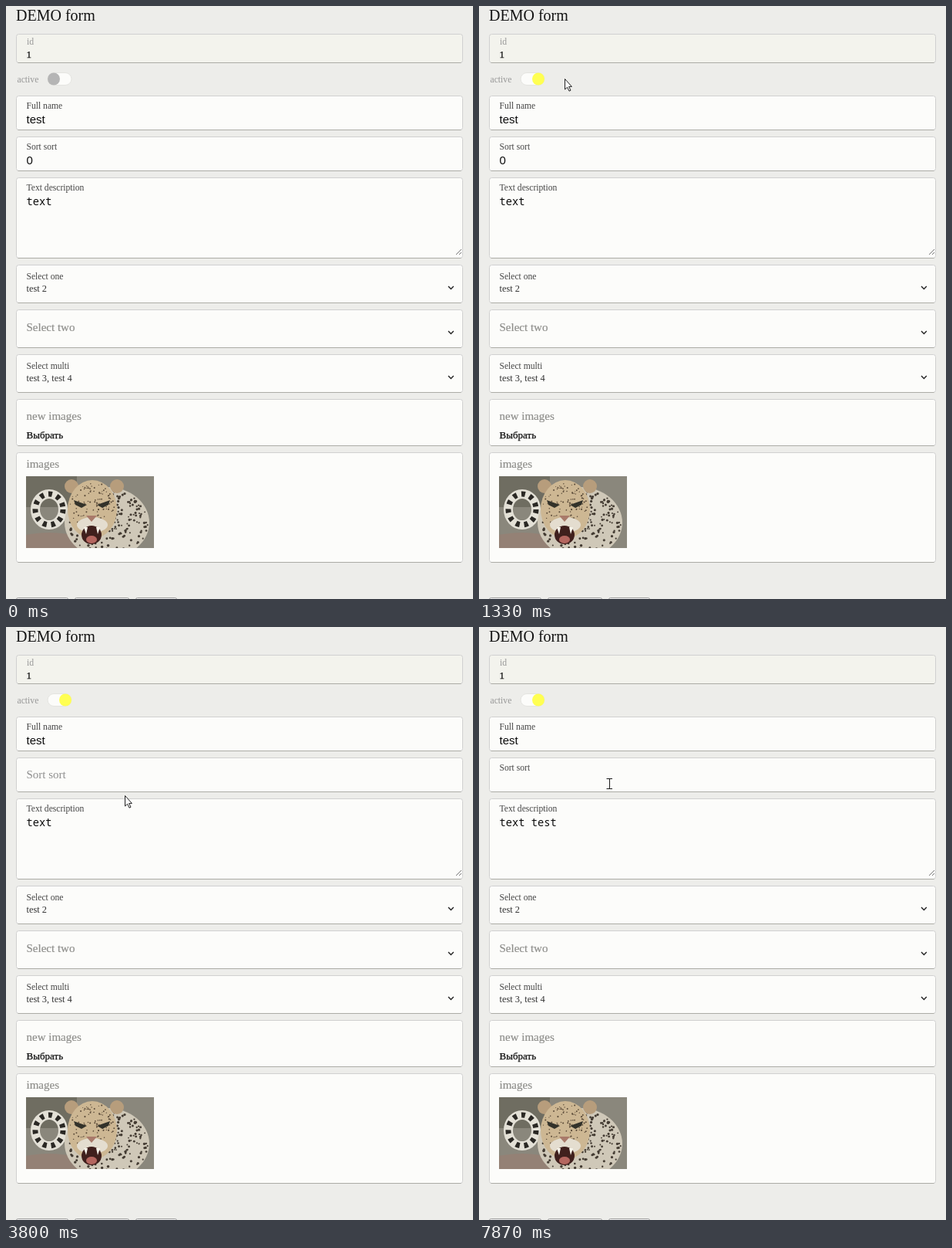
Animation of 606 by 768 pixels, one loop 8 s. Source, as an HTML page:

```html
<!DOCTYPE html>
<html lang="en">
<head>
<meta charset="utf-8">
<title>Demo form</title>
<style>
  html, body { margin: 0; width: 100%; height: 100%; overflow: hidden; background: #ededea; }
  svg { display: block; width: 606px; height: 768px; }
  text { font-family: "Liberation Serif", "Times New Roman", serif; white-space: pre; }
  .title { font-size: 20px; fill: #141414; }
  .label { font-size: 11.6px; fill: #444; }
  .dim { font-size: 11.7px; fill: #979797; }
  .hint { font-size: 15px; fill: #8f8f8c; stroke: #8f8f8c; stroke-width: .2; }
  .option { font-size: 12.4px; fill: #333; }
  .pick { font-size: 13px; fill: #0c0c0c; stroke: #0c0c0c; stroke-width: .25; }
  .input { font: 15px "Liberation Sans", Arial, sans-serif; fill: #0c0c0c; }
  .mono { font: 13.75px "Noto Sans Mono", "DejaVu Sans Mono", monospace; fill: #0c0c0c; }
</style>
</head>
<body>
<svg viewBox="0 0 606 768">
  <rect width="606" height="768" fill="#ededea"/>
  <g id="form"></g>

  <rect x="54" y="86.5" width="31" height="16" rx="8" fill="#fcfcfa" stroke="#e4e4e0"/>
  <circle id="knob" cy="94.5" r="8"/>

  <path d="M584 322l7 -7M588 322l3 -3" stroke="#777" fill="none"/>

  <clipPath id="frame"><rect width="166" height="93"/></clipPath>
  <g transform="translate(26 609)" clip-path="url(#frame)">
    <rect width="166" height="93" fill="#8a877c"/>
    <rect width="66" height="40" fill="#6f6d61"/>
    <ellipse cx="30" cy="95" rx="60" ry="22" fill="#948175"/>
    <ellipse cx="30" cy="43" rx="18" ry="20" fill="none" stroke="#e3e0d6" stroke-width="12"/>
    <ellipse cx="30" cy="43" rx="18" ry="20" fill="none" stroke="#2a2824" stroke-width="7" stroke-dasharray="5 6"/>
    <ellipse cx="105" cy="60" rx="55" ry="46" fill="#cfc8b8"/>
    <g id="coat" fill="#443c33"></g>
    <circle cx="59" cy="13" r="9" fill="#b79d7c"/>
    <circle cx="118" cy="13" r="9" fill="#b79d7c"/>
    <ellipse cx="86" cy="43" rx="32" ry="38" fill="#cdb793"/>
    <g id="face" fill="#5a4a38"></g>
    <path d="M62 31l17 6l-7 4l-8 -4zM109 31l-17 6l7 4l8 -4z" fill="#33322a"/>
    <ellipse cx="86" cy="63" rx="20" ry="10" fill="#e4ddcf"/>
    <path d="M78 51h14l-7 8z" fill="#a97a6a"/>
    <ellipse cx="85" cy="76" rx="13" ry="12" fill="#40201d"/>
    <ellipse cx="85" cy="82" rx="7" ry="5" fill="#b4665f"/>
    <path d="M75 66l3 9l2 -9M91 66l2 9l3 -9" fill="#f7f4ea"/>
  </g>

  <rect id="caret" width="1" fill="#111"/>
  <g id="cursor">
    <path id="pointer" d="M.5 .5V14L3.6 11.2L6 16.2L8 15.2L5.6 10.4H9.4Z" fill="#fff" stroke="#222" stroke-linejoin="round"/>
    <path id="beam" d="M-3.5 -6.5H4M.5 -6.5V6.5M-3.5 6.5H4" fill="none" stroke="#1c1c1c"/>
  </g>
</svg>
<script>
const LOOP = 8000, BLINK = 530, LEFT = 26.5, CHAR = 8.25;
const $ = id => document.getElementById(id);

function add(parent, tag, attrs, text) {
  const el = document.createElementNS("http://www.w3.org/2000/svg", tag);
  for (const k in attrs) el.setAttribute(k, attrs[k]);
  if (text) el.textContent = text;
  $(parent).appendChild(el);
  return el;
}
function set(el, attrs) {
  for (const k in attrs) el.setAttribute(k, attrs[k]);
}
const show = (el, on) => set(el, { visibility: on ? "visible" : "hidden" });
const word = (cls, x, y, s) => add("form", "text", { class: cls, x, y }, s);

function box(top, height, fill = "#fcfcfa") {
  add("form", "rect", { x: 13.5, y: top, width: 579, height, rx: 3, fill, stroke: "#d0d0d0" });
  add("form", "path", { d: `M15.5 ${top + height}H590.5`, stroke: "#acaca6" });
}

// Field builders: each draws at the given top and tells its height.
const input = (label, value, cls = "input", height = 44) => top => {
  box(top, height);
  return { top, height, typed: true,
    label: word("label", LEFT, top + 16, label),
    value: word(cls, LEFT, top + 35, value) };
};
const select = (label, value) => top => {
  box(top, 49);
  if (value) {
    word("label", LEFT, top + 18, label);
    word("option", LEFT, top + 34.5, value);
  } else word("hint", LEFT, top + 27.5, label);
  add("form", "path", { d: `M574 ${top + 27.5}l3.4 3.4l3.4 -3.4`, fill: "none", stroke: "#222", "stroke-width": 1.4 });
  return { top, height: 49 };
};
const files = (label, height, dy, action) => top => {
  box(top, height);
  word("hint", LEFT, top + dy, label);
  if (action) word("pick", LEFT, top + 50, action);
  return { top, height };
};

word("title", 13, 18.5, "DEMO form");
box(36.5, 37, "#f3f3ed");
word("dim", 27, 49.5, "id");
word("pick", LEFT, 67, "1");
word("dim", 14.5, 98.5, "active");

let top0 = 116.5;
const fields = [
  input("Full name", "test"),
  input("Sort sort", "0"),
  input("Text description", "text", "mono", 104),
  select("Select one", "test 2"),
  select("Select two"),
  select("Select multi", "test 3, test 4"),
  files("new images", 60, 26, "Выбрать"),
  files("images", 142, 19)
].map(build => {
  const field = build(top0);
  top0 += field.height + 9;
  return field;
});
const [, sort, note] = fields;

let left = 13.5;
for (const width of [67, 70, 53]) {
  add("form", "rect", { x: left, y: 766.5, width, height: 20, rx: 2, fill: "#efefef", stroke: "#a0a0a0" });
  left += width + 9;
}

let seed = 7;
const rnd = () => (seed = (seed * 16807) % 2147483647) / 2147483647;
function spots(parent, n, cx, cy, rx, ry, size) {
  for (let i = 0; i < n; i++) {
    const a = rnd() * 2 * Math.PI, d = Math.sqrt(rnd());
    add(parent, "circle", { cx: cx + rx * d * Math.cos(a), cy: cy + ry * d * Math.sin(a), r: size * (0.6 + rnd() * 0.6) });
  }
}
spots("coat", 240, 105, 60, 53, 44, 1.5);
spots("face", 110, 86, 38, 29, 31, 0.9);

const mix = (a, b, k) => a + (b - a) * k;
function ramp(t, from, dur) {
  const v = Math.max(0, Math.min(1, (t - from) / dur));
  return v * v * (3 - 2 * v);
}

// Moments of the story
const enter = 70, toggled = 1000, sortFocus = 2000, erased = 2870, sortBlur = 3600, sortAgain = 7340;
const keys = [4270, 4600, 4635, 4670, 5870];

const legs = [
  { at: enter, dur: 600, to: [84, 100] },
  { at: 730, dur: 140, to: [74, 97] },
  { at: 1070, dur: 260, to: [111, 94] },
  { at: 1530, dur: 600, to: [40, 198] },
  { at: 2400, dur: 130, to: [77, 205] },
  { at: 3270, dur: 400, to: [154, 218] },
  { at: 7070, dur: 400, to: [169, 203] }
];
function mouse(t) {
  let p = [336, 260];
  for (const { at, dur, to } of legs) {
    const k = ramp(t, at, dur);
    p = p.map((v, i) => mix(v, to[i], k));
  }
  return p.map(Math.round);
}

// The caret blinks from the latest click or key press.
function caret(t, typed) {
  let since, x = 27, y = sort.top + 21.5;
  if (t >= sortAgain) since = sortAgain;
  else if (typed) {
    since = keys[typed - 1];
    x = Math.floor(LEFT + (4 + typed) * CHAR);
    y = note.top + 21.5;
  } else if (t >= sortFocus && t < sortBlur) {
    since = sortFocus;
    if (t < erased) x = 35;
  }
  show($("caret"), since !== undefined && Math.floor((t - since) / BLINK) % 2 === 0);
  set($("caret"), { x, y, height: 18 });
}

function draw(t) {
  const on = ramp(t, toggled, 200), light = mix(181, 255, on);
  set($("knob"), { cx: mix(62, 77, on), fill: `rgb(${light},${light},${mix(181, 82, on)})` });

  const big = ramp(t, sortBlur, 180) - ramp(t, sortAgain, 180), gray = mix(68, 143, big);
  sort.label.style.fontSize = mix(11.6, 15, big) + "px";
  sort.label.style.fill = `rgb(${gray},${gray},${gray})`;
  set(sort.label, { y: sort.top + mix(16, 26, big) });
  show(sort.value, t < erased);

  const typed = keys.filter(k => t >= k).length;
  note.value.textContent = "text" + " test".slice(0, typed);
  caret(t, typed);

  const [x, y] = mouse(t);
  const editing = fields.some(f => f.typed && y >= f.top && y <= f.top + f.height);
  set($("cursor"), { transform: `translate(${x} ${y})` });
  show($("pointer"), t >= enter && !editing);
  show($("beam"), t >= enter && editing);
}

const start = performance.now();
function tick() {
  draw((performance.now() - start) % LOOP);
  requestAnimationFrame(tick);
}
tick();
</script>
</body>
</html>
```
